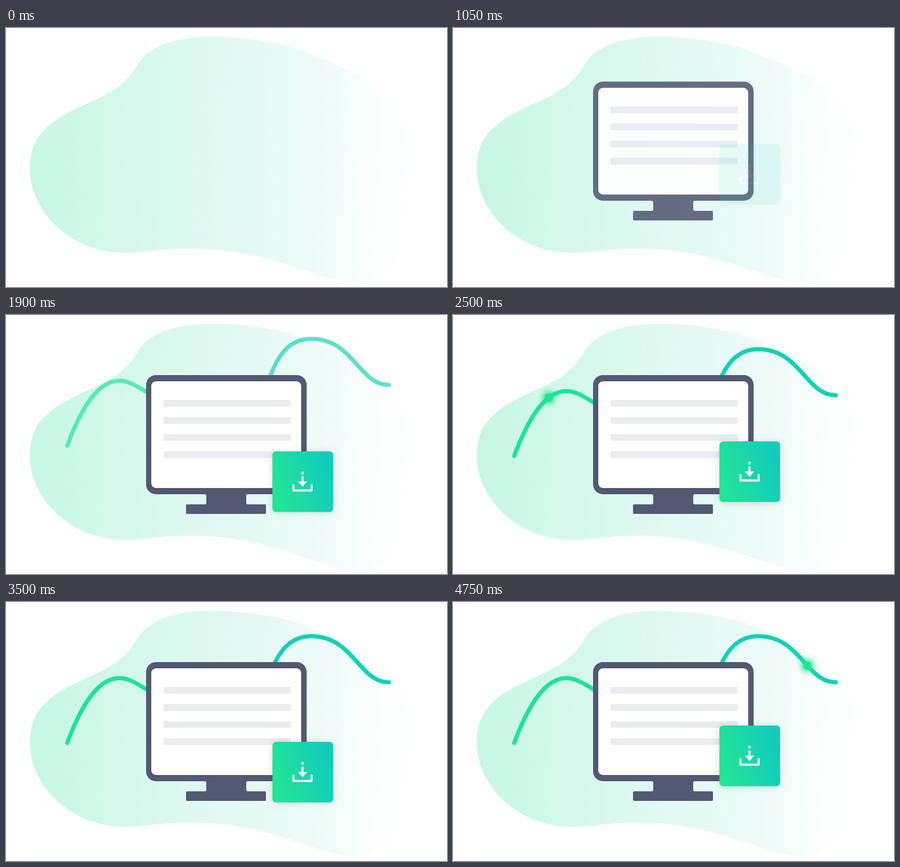
An HTML page with a canvas that plays this animation: 850x500 px, repeating every 4800 ms.

```html
<!DOCTYPE html>
<html lang="en">
<head>
<meta charset="utf-8">
<title>Download animation</title>
<style>
  html, body { margin: 0; width: 100%; height: 100%; overflow: hidden; background: #fff; }
  canvas { display: block; }
</style>
</head>
<body>
<canvas id="stage" width="850" height="500"></canvas>
<script>
const WIDTH = 850, HEIGHT = 500, LOOP = 4800, STEP = 50;
const stage = document.getElementById('stage').getContext('2d');
const buffer = document.createElement('canvas');
buffer.width = WIDTH;
buffer.height = HEIGHT;
const layer = buffer.getContext('2d');

const BLOB = new Path2D(`M46 273C46 230 60 210 80 191C100 172 125 161 150 149
  C205 125 230 110 253 72C272 38 320 17 395 17C460 17 530 27 580 47
  C620 64 655 78 685 95C725 118 760 155 792 205C795 260 785 340 775 385
  C765 440 735 492 680 492C640 492 590 472 540 456C470 434 420 426 350 426
  C300 426 265 434 230 434C120 434 46 350 46 273Z`);
const STAND = new Path2D(`M383 345V346Q386 346 386 349V362.5Q386 365.5 383 365.5H349
  Q347 365.5 347 367.5V382Q347 384 349 384H499Q501 384 501 382V367.5
  Q501 365.5 499 365.5H466Q463 365.5 463 362.5V349Q463 346 466 346V345Z`);
const leftCurve = makeCurve('M118 272C145 200 177 147 218 147C240 147 255 160 280 174');
const rightCurve = makeCurve('M505 150C522 99 545 66 588 66C670 66 680 155 738 155');

function makeCurve(d) {
  const node = document.createElementNS('http://www.w3.org/2000/svg', 'path');
  node.setAttribute('d', d);
  return { shape: new Path2D(d), length: node.getTotalLength(), at: s => node.getPointAtLength(s) };
}

const progress = (t, from, to) => Math.min(1, Math.max(0, (t - from) / (to - from)));

// Linear interpolation through [time, value] pairs.
function track(t, keys) {
  for (let i = 1; i < keys.length; i++) {
    const [t0, v0] = keys[i - 1], [t1, v1] = keys[i];
    if (t <= t1) return v0 + (v1 - v0) * progress(t, t0, t1);
  }
  return keys[keys.length - 1][1];
}

function gradient(ctx, x0, y0, x1, y1, stops) {
  const g = ctx.createLinearGradient(x0, y0, x1, y1);
  stops.forEach(([at, color]) => g.addColorStop(at, color));
  return g;
}

function roundRect(ctx, x, y, w, h, r, fill) {
  ctx.beginPath();
  ctx.roundRect(x, y, w, h, r);
  ctx.fillStyle = fill;
  ctx.fill();
}

// Composites a whole group at one opacity and vertical offset.
function group(alpha, dy, draw) {
  if (alpha <= 0) return;
  layer.clearRect(0, 0, WIDTH, HEIGHT);
  layer.save();
  layer.translate(0, dy);
  draw(layer);
  layer.restore();
  stage.globalAlpha = alpha;
  stage.drawImage(buffer, 0, 0);
  stage.globalAlpha = 1;
}

function drawBackground() {
  stage.fillStyle = '#fff';
  stage.fillRect(0, 0, WIDTH, HEIGHT);
  stage.fillStyle = gradient(stage, 46, 250, 795, 275, [
    [0, '#c6f7e2'], [0.34, '#d9f8ee'], [0.6, '#e6faf5'], [0.74, '#edfbf8'], [0.92, '#fcfffe'], [1, '#fff']
  ]);
  stage.fill(BLOB);
}

function drawCurves(ctx) {
  ctx.lineWidth = 8;
  ctx.lineCap = 'round';
  ctx.strokeStyle = '#20e29b';
  ctx.stroke(leftCurve.shape);
  ctx.strokeStyle = '#14d0b4';
  ctx.stroke(rightCurve.shape);
}

function drawOrb(curve, distance, alpha) {
  if (alpha <= 0 || distance >= curve.length) return;
  const { x, y } = curve.at(distance);
  const glow = stage.createRadialGradient(x, y, 0, x, y, 22);
  [[0, 1], [0.31, 1], [0.4, 0.6], [0.6, 0.3], [0.8, 0.09], [1, 0]]
    .forEach(([at, a]) => glow.addColorStop(at, `rgba(33,228,145,${a})`));
  stage.globalAlpha = alpha;
  stage.fillStyle = glow;
  stage.fillRect(x - 22, y - 22, 44, 44);
  stage.globalAlpha = 1;
}

function drawMonitor(ctx) {
  roundRect(ctx, 270, 116, 309.5, 230, 19, '#535873');
  ctx.fill(STAND);
  roundRect(ctx, 280, 128, 289, 206, 9, '#fff');
  for (let i = 0; i < 4; i++) roundRect(ctx, 304, 164 + i * 33, 245, 13, 2, '#ebecf0');
}

// The tile is drawn with its top edge at zero.
function drawTile(ctx) {
  const left = 513.5, size = 117, mid = left + size / 2 - 0.5;
  ctx.shadowColor = 'rgba(40,70,80,0.2)';
  ctx.shadowBlur = 13;
  ctx.shadowOffsetY = 1;
  roundRect(ctx, left, 0, size, size, 7,
    gradient(ctx, left + 8, 76, left + 112, 44, [[0, '#22e398'], [1, '#13cbbb']]));
  ctx.shadowColor = 'transparent';

  roundRect(ctx, mid - 2.2, 39, 4.4, 5.5, 1.5, '#fff');
  roundRect(ctx, mid - 2, 48, 4, 12, 1, '#fff');
  ctx.beginPath();
  ctx.moveTo(mid - 9, 58);
  ctx.lineTo(mid + 9, 58);
  ctx.lineTo(mid, 68.5);
  ctx.fill();
  ctx.beginPath();
  ctx.moveTo(mid - 17.5, 65);
  ctx.lineTo(mid - 17.5, 75.5);
  ctx.lineTo(mid + 17.5, 75.5);
  ctx.lineTo(mid + 17.5, 65);
  ctx.lineWidth = 4;
  ctx.lineCap = ctx.lineJoin = 'round';
  ctx.strokeStyle = '#fff';
  ctx.stroke();
}

function render(t) {
  drawBackground();

  const curveIn = progress(t, 1500, 2100);
  group(curveIn, -60 * (1 - curveIn), drawCurves);

  const u = (t - 2250) / 250;
  drawOrb(leftCurve, 74 + 58 * u + 11 * u * (u - 1), progress(t, 2200, 2400));
  const run = Math.max(0, t - 3700) / 1050;
  drawOrb(rightCurve, 32 + 210 * run * run, progress(t, 3750, 3950));

  const monitorIn = progress(t, 0, 1200);
  group(monitorIn, -100 * (1 - monitorIn), drawMonitor);

  const tileTop = track(t, [[1000, 219], [1550, 274.5], [2700, 237.5], [3600, 274], [4800, 237]]);
  group(progress(t, 1000, 1550), tileTop, drawTile);
}

const start = performance.now();
function tick() {
  const t = (performance.now() - start) % LOOP;
  render(Math.floor(t / STEP) * STEP);
  requestAnimationFrame(tick);
}
tick();
</script>
</body>
</html>
```
